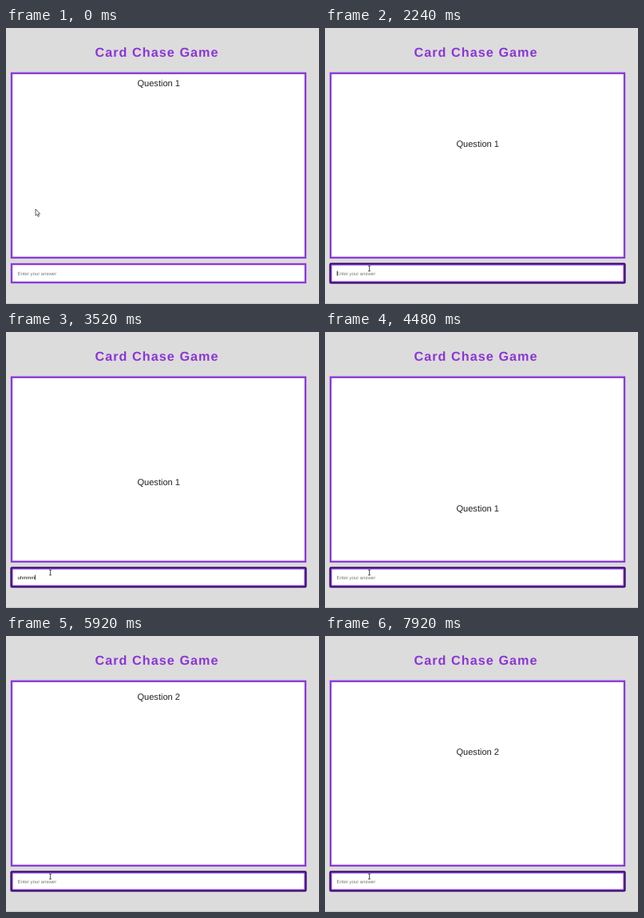
Animation of 392 by 346 pixels, one loop 8 s. Source, as an HTML page:

```html
<!DOCTYPE html>
<html lang="en">
<head>
<meta charset="utf-8">
<title>Card Chase Game</title>
<style>
  html, body { margin: 0; width: 100%; height: 100%; overflow: hidden; background: #dcdcdc; }
  svg { display: block; }
  text { font-family: "Liberation Sans", Arial, sans-serif; text-rendering: geometricPrecision; white-space: pre; }
  .frame { fill: #fff; stroke: #8b3bd9; stroke-width: 2.4; }
  #title { font-size: 16.2px; font-weight: bold; letter-spacing: 1.05px; fill: #8b35d6; }
  #question { font-size: 11.1px; fill: #222; }
  #entry { font-size: 6px; }
</style>
</head>
<body>
<svg width="392" height="346" viewBox="0 0 392 346">
  <rect width="392" height="346" fill="#dcdcdc"/>
  <path d="M0 345.5H392" stroke="#c6c6c6"/>
  <text id="title" x="111.4" y="36">Card Chase Game</text>
  <rect class="frame" x="7" y="56.7" width="368" height="231.2"/>
  <rect class="frame" x="7" y="296" width="368" height="23"/>
  <g id="focus" fill="none">
    <rect x="6.5" y="295.5" width="369" height="24" rx="1" stroke="#2d0b5c" stroke-width="2"/>
    <rect x="8" y="297" width="366" height="21" stroke="#8b3bd9"/>
  </g>
  <text id="question" x="164.4"></text>
  <text id="entry" x="14.5" y="309.5"></text>
  <path id="caret" d="M0 304.5V310.5" stroke="#111" stroke-width=".8"/>
  <path id="arrow" d="M0 0V8.2L1.9 6.5L3.2 9.4L4.5 8.8L3.2 6H5.6Z" fill="#fff" stroke="#222" stroke-width=".7"/>
  <path id="beam" d="M-1.5-3.2H1.5M0-3.2V3.2M-1.5 3.2H1.5" fill="none" stroke="#333" stroke-width=".8"/>
</svg>
<script>
const LOOP = 8000, STEP = 80;
const FOCUS = 960, TYPE = 2800, KEY = 120, CLEAR = 3940, NEXT = 5520;
const WORD = "uhmmm";
const el = id => document.getElementById(id);
const [question, entry, caret, arrow, beam, focus] =
  ["question", "entry", "caret", "arrow", "beam", "focus"].map(el);
const show = (node, on) => node.setAttribute("visibility", on ? "visible" : "hidden");

// Piecewise linear track of [time, value...] points
function track(points, t) {
  let i = 1;
  while (i < points.length - 1 && t > points[i][0]) i++;
  const a = points[i - 1], b = points[i];
  const k = Math.min(1, Math.max(0, (t - a[0]) / (b[0] - a[0])));
  return a.slice(1).map((v, n) => v + (b[n + 1] - v) * k);
}

const fall = [[0, 69], [1040, 103.5], [NEXT, 257]];
const mouse = [[0, 37, 227], [80, 37, 227], [240, 31, 270], [480, 36, 334], [640, 46, 326], [880, 55.5, 301.5]];

function drawQuestion(t) {
  const second = t >= NEXT;
  const y = second ? 62.2 + (t - NEXT) * 0.0345 : track(fall, t)[0];
  question.textContent = second ? "Question 2" : "Question 1";
  question.setAttribute("y", y + 4);
}

function drawEntry(t) {
  const count = t < TYPE || t >= CLEAR ? 0 : Math.min(WORD.length, 1 + Math.floor((t - TYPE) / KEY));
  entry.textContent = count ? WORD.slice(0, count) : "Enter your answer";
  entry.setAttribute("fill", count ? "#111" : "#777");
  const lastKey = t >= CLEAR ? CLEAR : count ? TYPE + (count - 1) * KEY : FOCUS;
  show(caret, t >= FOCUS && (t - lastKey) % 1000 < 500);
  const x = count ? 14.8 + entry.getComputedTextLength() : 15.3;
  caret.setAttribute("transform", `translate(${x})`);
  show(focus, t >= FOCUS);
}

function drawMouse(t) {
  const [x, y] = track(mouse, t);
  const inside = y > 295 && y < 320;
  show(arrow, !inside);
  show(beam, inside);
  for (const node of [arrow, beam]) node.setAttribute("transform", `translate(${x} ${y})`);
}

let start;
function draw(now) {
  start ??= now;
  const t = Math.floor((now - start) % LOOP / STEP) * STEP;
  drawQuestion(t);
  drawEntry(t);
  drawMouse(t);
  requestAnimationFrame(draw);
}
requestAnimationFrame(draw);
</script>
</body>
</html>
```
